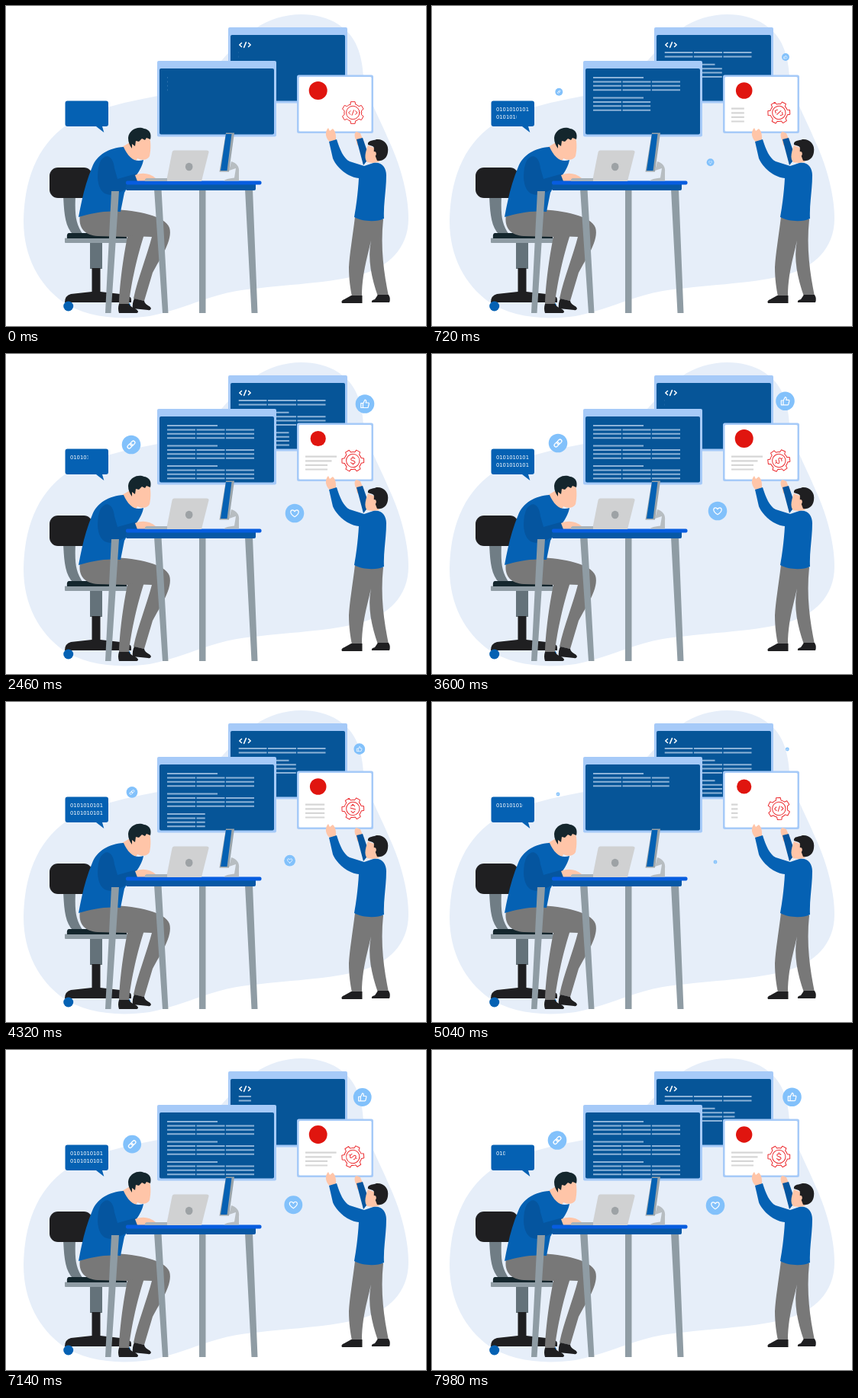
Recreate the animation shown at these times as an HTML page. Size 550x420 px, loop 8 s.

```html
<!DOCTYPE html>
<html lang="en">
<head>
<meta charset="utf-8">
<title>Developers at work</title>
<style>
  html, body { margin: 0; width: 100%; height: 100%; overflow: hidden; background: #fff; }
  svg { display: block; width: 550px; height: 420px; }
  .code { font: 6.76px "DejaVu Sans", sans-serif; fill: #fff; }
  .shirt { fill: #0561b3; } .sleeve { fill: #05559f; } .skin { fill: #ffc5a8; }
  .trousers { fill: #787878; } .black { fill: #1f1f21; } .steel { fill: #8f9ca4; }
  .frame { fill: #a6caf8; } .screen { fill: #065598; } .hair { fill: #14262d; }
  .line { fill: none; stroke-linecap: round; stroke-linejoin: round; }
</style>
</head>
<body>
<svg viewBox="0 0 550 420">
  <defs>
    <clipPath id="type0"><rect x="84" y="130" width="0" height="10"/></clipPath>
    <clipPath id="type1"><rect x="84" y="140" width="0" height="10"/></clipPath>
    <clipPath id="noteClip"><rect x="392" y="130" width="0" height="26"/></clipPath>
  </defs>

  <path fill="#e6eef9" d="M23 282C24 218 48 166 104 143C150 124 196 121 230 110C272 98 294 48 326 30C358 7 405 5 435 24C459 39 466 64 468 92C472 118 488 144 502 178C516 208 527 246 527 279C527 317 502 344 459 354C416 365 354 366 302 374C262 381 230 399 188 407C145 413 103 408 74 388C44 366 23 330 23 282Z"/>

  <!-- back window -->
  <rect class="frame" x="291" y="28" width="156" height="99.500" rx="2"/>
  <rect class="screen" x="294" y="38" width="150" height="86.500" rx="2"/>
  <path class="line" stroke="#fff" stroke-width="1.500" d="M308.500 48.500L305.800 51L308.500 53.500M317.500 48.500L320.200 51L317.500 53.500M314.400 47.600L311.600 54.400"/>
  <g id="backLines"></g>

  <!-- front window -->
  <rect class="frame" x="198" y="72" width="156" height="99.500" rx="2"/>
  <rect class="screen" x="201" y="82" width="150" height="86.500" rx="2"/>
  <g id="frontLines"></g>

  <!-- card -->
  <rect class="frame" x="381" y="90.500" width="100" height="76.500" rx="2.500"/>
  <rect fill="#fff" x="383.500" y="93" width="95" height="71.500" rx="1.500"/>
  <circle id="badge" cx="408.700" cy="111" r="12" fill="#e0150f"/>
  <path clip-path="url(#noteClip)" stroke="#d6d6d6" stroke-width="2.200" d="M392 134.700H433M392 140.300H426.500M392 145.900H421M392 151.500H421"/>
  <g id="gear" class="line" stroke="#ec2b2f" stroke-width="1">
    <path id="teeth"/>
    <circle r="8.700"/>
    <path id="tag" d="M-3.300 -2.400L-5.700 0L-3.300 2.400M3.300 -2.400L5.700 0L3.300 2.400M1.200 -3.300L-1.200 3.300"/>
    <path id="coin" d="M2.600 -2.600C1.600 -4.300 -2.600 -4 -2.600 -1.900C-2.600 .3 2.700 -.4 2.700 2C2.700 4.200 -1.800 4.300 -2.800 2.500M0 -5.600V-3.700M0 3.700V5.600"/>
  </g>

  <!-- speech bubble -->
  <path class="shirt" d="M80.500 124.500H131Q134 124.500 134 127.500V155Q134 158 131 158H126L128.300 166L118 158H80.500Q77.500 158 77.500 155V127.500Q77.500 124.500 80.500 124.500Z"/>
  <g class="code">
    <text x="84" y="138" clip-path="url(#type0)">0101010101</text>
    <text x="84" y="148" clip-path="url(#type1)">0101010101</text>
  </g>

  <!-- chair -->
  <path fill="#707d85" d="M75 249H91C90 274 91 286 101 300H88C77 290 76 270 75 249Z"/>
  <rect class="black" x="57" y="212" width="56" height="40" rx="11"/>
  <rect class="steel" x="77" y="304.500" width="84" height="6.500" rx="1"/>
  <path class="hair" d="M82 298H158V305H80Q79 299 82 298Z"/>
  <rect fill="#64727a" x="110" y="311" width="16" height="34"/>
  <path class="black" d="M112.500 344H123.500V375L158 379Q165 381 164 389H77Q77 380 85 378L112.500 375Z"/>
  <circle class="shirt" cx="81.700" cy="394" r="6.500"/>
  <circle class="shirt" cx="157" cy="394" r="6"/>

  <!-- seated man -->
  <path class="trousers" d="M97 274C94 292 104 301 120 302L159 303C155 322 149 360 148 391H161C163 370 170 335 180 303L190 280L140 267Z"/>
  <path class="trousers" d="M140 267C172 268 209 276 214 291C219 307 202 331 192 350L181 387L167 384C173 356 184 330 191 303L140 301Z"/>
  <path class="black" d="M148 391H161C164 397 172 397 173 401Q173 403 170 403H148Q146 397 148 391ZM168 384L181 387C182 393 189 393 190 397Q189 400 186 399L166 397Q165 390 168 384Z"/>
  <path class="skin" d="M147 188L164 178L178 190L168 207H155Z"/>
  <path class="shirt" d="M154 185C160 199 169 206 180 202C177 218 166 226 155 245L150 270C130 268 113 272 95 277C99 255 104 232 113 211C119 196 134 186 154 185Z"/>
  <path class="sleeve" d="M124 203C132 191 141 199 142 213L146 227L171 220L174 232L144 247C126 251 121 239 120 225Q120 211 124 203Z"/>
  <path class="skin" d="M169 222C178 218 188 219 196 226L194 230H172Z"/>
  <path class="skin" d="M165 171L187 169C190 177 190 188 188 197C185 204 173 203 167 196C159 193 159 184 164 181Z"/>
  <path class="hair" d="M160 173C161 162 173 157 181 161C188 162 191 168 189 175L184 173L182 176L178 174L174 178L170 177L169 184L165 181L165 187C162 183 160 179 160 173Z"/>

  <!-- desk, laptop and monitor -->
  <path class="steel" d="M138 243H148L137.500 403H130ZM194 240H203.500L212.500 403H205ZM253 240H261.500V403H253ZM313 240H323L329.500 403H321.500Z"/>
  <path fill="#0758a5" d="M158 234H327V240Q327 242 325 242H158Q155 238 158 234Z"/>
  <rect fill="#075de0" x="157" y="229.500" width="177.500" height="5" rx="2"/>
  <path fill="#d0d1d2" d="M220 189.500H263Q266 189.500 265.500 192L256 230H210L217.500 192Q218 189.500 220 189.500Z"/>
  <path fill="#a9b3ba" d="M184 226H211V230H182Q181 227 184 226Z"/>
  <ellipse fill="#9da2a5" cx="239.700" cy="211" rx="4.800" ry="5.200"/>
  <path fill="#b7bdc1" d="M295 204C302 206 306 211 305 218V229.500H285Q288 226.500 299 225.500L301 213L292 216Z"/>
  <path fill="#9aa4aa" d="M288 166.500H299L292 217.500H279.500Z"/>
  <path class="shirt" d="M288 168H295.500L289.500 216H281Z"/>

  <!-- standing helper -->
  <path class="trousers" d="M457 277C454 302 450 325 449 343C449 358 451 371 453 381H466C466 362 469 346 473 329L478 308C473 332 479 358 487 381H501C495 351 490 318 494 280Z"/>
  <path class="black" d="M452 380H466.500V390H440Q438 387 443 385ZM487 379H501Q504 384 502 389H479Q478 386 483 385Z"/>
  <path class="skin" d="M425 179C418 174 417 165 422 160L424 164L428 161C433 166 432 173 432 178ZM458 175C456 171 456 166 459 165L464 167L469 179L460 183Z"/>
  <path class="sleeve" d="M459 175L467 173L476 199L468 209Z"/>
  <path class="skin" d="M474 183C470 193 469 201 473 205L480 206L488 205L492 190Z"/>
  <path class="shirt" d="M423 178L433 175C437 188 442 200 450 204L469 210L481 206C492 204 498 212 498 222C498 242 494 260 495 279C485 284 467 283 456 277C459 260 461 244 462 226C444 224 431 208 428 200Z"/>
  <path class="black" d="M474 182C473 176 481 177 485 175C494 174 502 181 500 192C499 200 493 204 486 203L483 195C480 189 484 186 480 184Z"/>
  <ellipse class="skin" cx="482.500" cy="194" rx="2.300" ry="3"/>

  <!-- floating reactions -->
  <g class="float line" stroke="#fff" stroke-width="1.300">
    <circle r="12.300" fill="#82c1fb" stroke="none"/>
    <g transform="rotate(-45)"><rect x="-6" y="-2.200" width="7" height="4.400" rx="2.200"/><rect x="-1" y="-2.200" width="7" height="4.400" rx="2.200"/></g>
  </g>
  <g class="float line" stroke="#fff" stroke-width="1.200">
    <circle r="12.300" fill="#82c1fb" stroke="none"/>
    <path d="M-5.200 -.8H-2.500V5H-5.200ZM-2.500 -.3L0 -5.300C2 -5.300 1.800 -3.500 1.300 -1.500H4.700Q5.600 -1.300 5.300 0L4.300 4.200Q4 5 3.200 5H-2.500"/>
  </g>
  <g class="float line" stroke="#fff" stroke-width="1.200">
    <circle r="12.300" fill="#82c1fb" stroke="none"/>
    <path d="M0 4.700C-3.500 2.300 -5.200 .5 -5.200 -1.600C-5.200 -4.700 -1.300 -5 0 -2.200C1.300 -5 5.200 -4.700 5.200 -1.600C5.200 .5 3.500 2.300 0 4.700Z"/>
  </g>
</svg>

<script>
const LOOP = 8000, STEP = 450;
const $ = id => document.getElementById(id);
const clamp = v => Math.max(0, Math.min(1, v));

// Distance in ms from the nearer end of a there-and-back cycle.
const bounce = (t, period) => {
  const phase = t % period;
  return Math.min(phase, period - phase);
};
const easeInOut = u => u < .5 ? 4 * u ** 3 : 1 - 4 * (1 - u) ** 3;

// Three blocks, each a heading bar over rows of three bars, wiped in from the left.
function addBlocks(host, x, top, firstHeading) {
  return [0, 1, 2].map(i => {
    const id = host.id + i, y = top + i * 26.5;
    let d = i || firstHeading ? `M${x} ${y}h66` : '';
    for (let row = 1; row <= 3; row++) {
      // Without a heading the first row gives way to the code mark.
      if (!i && !firstHeading && row === 1) continue;
      for (const column of [0, 38.5, 77]) d += `M${x + column} ${y + row * 5.4}h37`;
    }
    host.insertAdjacentHTML('beforeend',
      `<clipPath id="${id}"><rect x="${x}" y="40" width="0" height="130"/></clipPath>
       <path clip-path="url(#${id})" stroke="#8db3d8" stroke-width="2" d="${d}"/>`);
    return $(id).firstElementChild;
  });
}

const front = addBlocks($('frontLines'), 211, 94, true);
const back = addBlocks($('backLines'), 304.5, 50.3, false);
const typed = [0, 1].map(i => $('type' + i).firstElementChild);
const note = $('noteClip').firstElementChild;

const polar = (r, deg) => {
  const a = deg * Math.PI / 180;
  return `${(r * Math.sin(a)).toFixed(2)} ${(-r * Math.cos(a)).toFixed(2)}`;
};
let outline = '';
for (let a = 0; a < 360; a += 60) {
  outline += (a ? 'L' : 'M') + [[11.4, -17], [14.6, -11], [14.6, 11], [11.4, 17]]
    .map(([r, off]) => polar(r, a + off)).join('L') + `A11.4 11.4 0 0 1 ${polar(11.4, a + 43)}`;
}
$('teeth').setAttribute('d', outline + 'Z');

// Drift waypoints: time, x, y.
const drifts = [
  [[0, 167, 110], [1440, 165.5, 115.5], [2460, 164, 119], [3600, 165, 117], [5040, 165, 121],
   [6300, 166, 127], [7980, 164, 118.5]],
  [[0, 462, 66], [720, 463, 67], [1440, 471, 68], [1950, 474, 66.3], [2460, 470, 65.5],
   [3600, 462.5, 61.8], [5040, 465.3, 62], [5700, 471.5, 62], [6300, 471, 61.5],
   [7200, 466.7, 62], [7980, 471.5, 61.7]],
  [[0, 362, 203], [1440, 368, 207.3], [2460, 378, 209], [3600, 374, 206], [5040, 371, 210],
   [6300, 379.5, 203.5], [7980, 371, 204]]
];
const floats = [...document.querySelectorAll('.float')];

function along(keys, t) {
  let i = 0;
  while (i < keys.length - 2 && t > keys[i + 1][0]) i++;
  const a = keys[i], b = keys[i + 1];
  const before = keys[i - 1] || a, after = keys[i + 2] || b;
  const span = b[0] - a[0], u = clamp((t - a[0]) / span), v = 1 - u;
  return [1, 2].map(k => {
    const leave = (b[k] - before[k]) / (b[0] - before[0]) * span;
    const arrive = (after[k] - a[k]) / (after[0] - a[0]) * span;
    return v * v * (1 + 2 * u) * a[k] + u * u * (3 - 2 * u) * b[k]
      + u * v * v * leave - u * u * v * arrive;
  });
}

function wipe(rects, ms, width) {
  rects.forEach((rect, i) => rect.setAttribute('width', width * clamp(ms / STEP - i)));
}

function draw(t) {
  const slow = bounce(t, 5400), medium = bounce(t, 3600);
  wipe(typed, bounce(t, 2700), 44);
  wipe(front, slow, 125);
  wipe(back, medium, 125);

  const grow = clamp(slow / 1800);
  note.setAttribute('width', 42 * grow);
  floats.forEach((el, i) => {
    const [x, y] = along(drifts[i], t);
    el.setAttribute('transform', `translate(${x} ${y}) scale(${grow})`);
  });

  $('badge').setAttribute('r', 12 - 3 * medium / 1800);

  const turn = 360 * easeInOut(t % 2700 / 2700);
  const money = slow > 1350;
  $('gear').setAttribute('transform', `translate(454.3 140) rotate(${turn})`);
  $('teeth').setAttribute('transform', `rotate(${money ? 30 : 0})`);
  $('tag').style.display = money ? 'none' : '';
  $('coin').style.display = money ? '' : 'none';
}

function tick() {
  draw(performance.now() % LOOP);
  requestAnimationFrame(tick);
}
tick();
</script>
</body>
</html>
```
